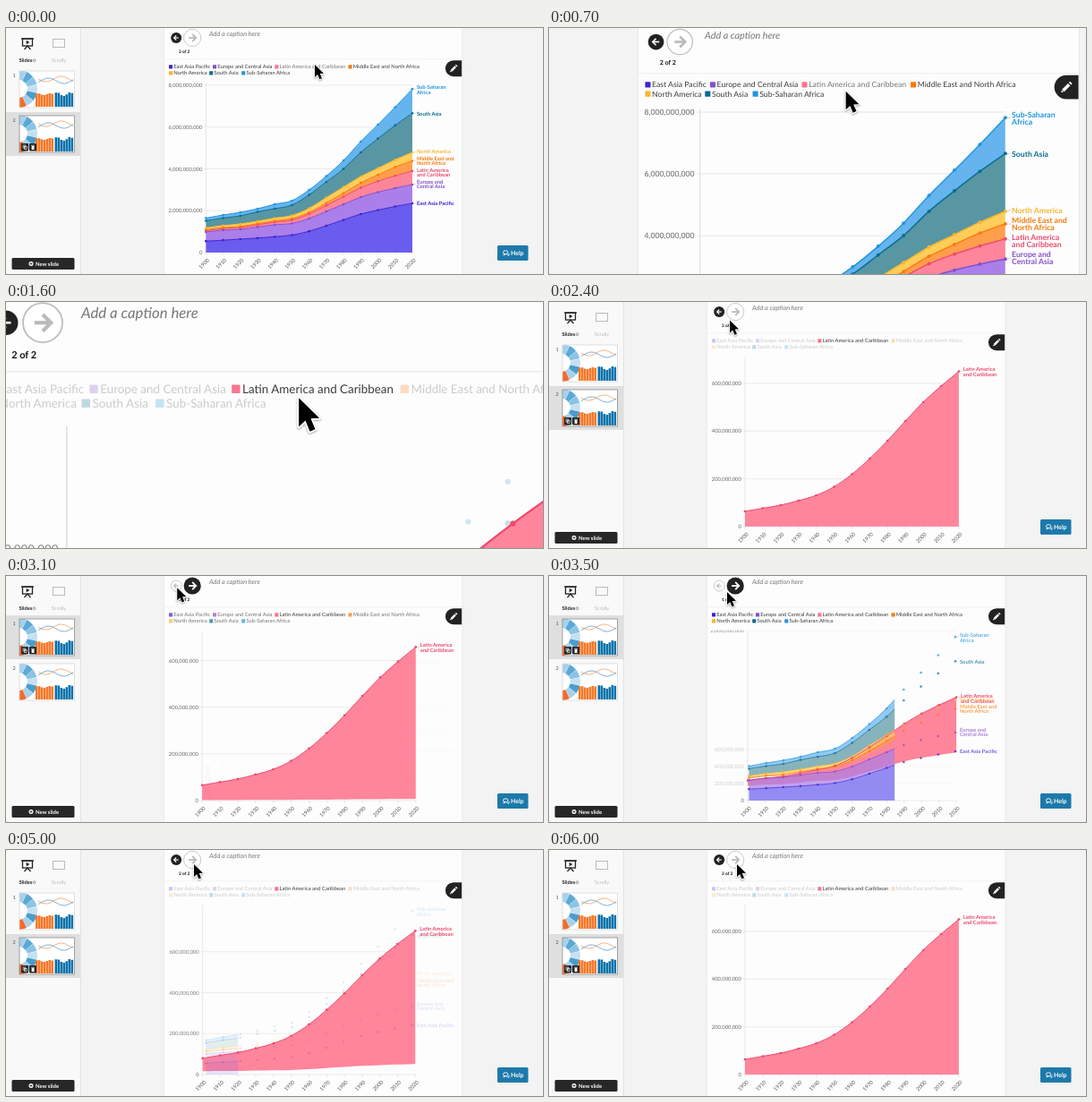
Recreate the animation shown at these times as an HTML page with a canvas. Size 600x275 px, loop 6100 ms.

```html
<!DOCTYPE html>
<html lang="en">
<head>
<meta charset="utf-8">
<title>Stacked area story</title>
<style>
html, body { margin: 0; width: 100%; height: 100%; overflow: hidden; background: #f3f3f3; }
canvas { display: block; width: 600px; height: 275px; }
</style>
</head>
<body>
<canvas id="stage" width="600" height="275"></canvas>
<script>
const ctx = document.getElementById('stage').getContext('2d');
ctx.textRendering = 'geometricPrecision';
const LOOP = 6100, BASE = 251, FOCUS = 2;
const CLICKS = { filter: 975, back: 2920, next: 4340 };
const WIDE = { left: 223.4, right: 454 }, ALONE = { left: 219, right: 457.9 };

// Cumulative heights in pixels for each decade, 1900 to 2020.
const europeTop = [23, 25, 26, 28.5, 31, 32.5, 38, 46, 54, 62, 67.5, 72, 76];
const focusAlone = [17, 20.5, 24, 29, 35, 44.5, 58.5, 76, 96, 118, 139, 157, 173.5];
const series = [
  { name: 'East Asia Pacific', line: '#3d22d6', fill: '#695cee', key: [182, 0],
    label: ['East Asia Pacific'], labelY: 196,
    top: [12.8, 13.8, 15, 16.2, 17.7, 19.5, 23.8, 30, 36.5, 43, 47.5, 51.5, 55] },
  { name: 'Europe and Central Asia', line: '#8450cf', fill: '#ab7fe9', key: [231, 0],
    label: ['Europe and', 'Central Asia'], labelY: 174.3, top: europeTop },
  { name: 'Latin America and Caribbean', line: '#ee4a6f', fill: '#ff859b', key: [300.3, 0],
    label: ['Latin America', 'and Caribbean'], labelY: 161.6,
    top: europeTop.map((y, i) => y + focusAlone[i] * .0877) },
  { name: 'Middle East and North Africa', line: '#f77b0b', fill: '#ff9e4b', key: [382.5, 0],
    label: ['Middle East and', 'North Africa'], labelY: 148.6,
    top: [25.6, 27.9, 29.2, 32.4, 35.5, 38, 45, 55.5, 66.5, 78, 87, 95.6, 102.5] },
  { name: 'North America', line: '#f9b52e', fill: '#ffcd5a', key: [182, 1],
    label: ['North America'], labelY: 138,
    top: [27.5, 30.2, 32, 35, 38.5, 41.5, 49.5, 61.5, 73.3, 85, 94.3, 103.7, 112] },
  { name: 'South Asia', line: '#0b6d91', fill: '#5796a2', key: [227.2, 1],
    label: ['South Asia'], labelY: 95.5,
    top: [35.5, 38.5, 41, 45.5, 49, 53, 64.5, 79, 93.6, 112, 127.4, 142.2, 155.7] },
  { name: 'Sub-Saharan Africa', line: '#2196de', fill: '#65b4ee', key: [263.2, 1],
    label: ['Sub-Saharan', 'Africa'], labelY: 68.7,
    top: [38.5, 42, 45, 49, 54, 58, 70, 85.5, 103, 124, 143, 162.5, 182.8] }
];
const drawOrder = [2, 0, 1, 3, 4, 5, 6];

const cursorPath = [[0, 345, 41], [500, 333.6, 48.3], [1620, 333, 47.7], [2400, 202, 20.5], [2750, 191, 13],
  [3050, 191, 13], [3500, 199, 18], [4000, 210, 16], [LOOP, 210, 16]];

const clamp = v => Math.max(0, Math.min(1, v));
const lerp = (a, b, k) => a + (b - a) * k;
const cubic = v => (v = clamp(v)) < .5 ? 4 * v ** 3 : 1 - 4 * (1 - v) ** 3;
const sine = v => (1 - Math.cos(Math.PI * clamp(v))) / 2;

function withAlpha(alpha, draw) {
  ctx.save();
  ctx.globalAlpha *= alpha;
  draw();
  ctx.restore();
}

function clipRect(x, y, w, h) {
  ctx.beginPath();
  ctx.rect(x, y, w, h);
  ctx.clip();
}

function rect(x, y, w, h, fill, radius = 0) {
  ctx.fillStyle = fill;
  ctx.beginPath();
  ctx.roundRect(x, y, w, h, radius);
  ctx.fill();
}

function circle(x, y, r, fill, stroke) {
  ctx.beginPath();
  ctx.arc(x, y, r, 0, 7);
  if (fill) { ctx.fillStyle = fill; ctx.fill(); }
  if (stroke) { ctx.strokeStyle = stroke; ctx.lineWidth = .8; ctx.stroke(); }
}

function stroke(points, color, width = 1) {
  ctx.strokeStyle = color;
  ctx.lineWidth = width;
  ctx.beginPath();
  points.forEach(p => ctx.lineTo(...p));
  ctx.stroke();
}

function text(value, x, y, size, color, style = '', align = 'left') {
  ctx.font = `${style} ${size}px Lato, sans-serif`;
  ctx.fillStyle = color;
  ctx.textAlign = align;
  ctx.textBaseline = 'alphabetic';
  ctx.fillText(value, x, y + size * .36);
}

function curve(points) {
  const n = points.length - 1;
  ctx.lineTo(...points[0]);
  for (let i = 0; i < n; i++) {
    const a = points[Math.max(0, i - 1)], b = points[i], c = points[i + 1], d = points[Math.min(n, i + 2)];
    ctx.bezierCurveTo(b[0] + (c[0] - a[0]) / 6, b[1] + (c[1] - a[1]) / 6,
      c[0] - (d[0] - b[0]) / 6, c[1] - (d[1] - b[1]) / 6, ...c);
  }
}

// 0 shows every series, 1 shows the focused one alone.
function focusAt(t) {
  if (t < CLICKS.back) return cubic((t - CLICKS.filter) / 1000);
  if (t < CLICKS.next) return 1 - cubic((t - CLICKS.back) / 1000);
  return cubic((t - CLICKS.next) / 1000);
}

function legendFade(t) {
  const since = start => clamp((t - start) / 300);
  if (t < CLICKS.back) return since(CLICKS.filter);
  return t < CLICKS.next ? 1 - since(CLICKS.back) : since(CLICKS.next);
}

function drawThumb(y, number, selected) {
  if (selected) rect(0, y - 4, 83, 49, '#dfdfdf');
  text(number, 9, y + 5, 5.5, '#555', '', 'center');
  rect(15, y, 61.5, 41, '#fff');
  ctx.save();
  clipRect(15, y, 61.5, 41);
  const shades = ['#a7d1ea', '#5ba9d6', '#8cc3e4', '#c5e0f1', '#4b9dcd', '#a7d1ea', '#f26b2c'];
  shades.forEach((shade, i) => {
    const a = -1.57 + i * .45;
    ctx.fillStyle = shade;
    ctx.beginPath();
    ctx.arc(14, y + 20, 21, a, a + .43);
    ctx.arc(14, y + 20, 10, a + .43, a, true);
    ctx.fill();
  });
  const wave = (phase, height) => Array.from({ length: 9 }, (_, i) =>
    [36 + i * 4.9, y + height + 3.2 * Math.sin(i * .9 + phase)]);
  stroke(wave(0, 9), '#f0924e', .7);
  stroke(wave(2.6, 11), '#4d8fb8', .7);
  for (let i = 0; i < 7; i++) {
    const orange = 14 + Math.sin(i * 1.3 + 1), blue = 14 + 2 * Math.sin(i * 1.3 + 1);
    rect(33 + i * 2.9, y + 40 - orange, 2.6, orange, '#f5792a');
    rect(54.5 + i * 3, y + 40 - blue, 2.6, blue, '#0c73aa');
  }
  ctx.restore();
  ctx.strokeStyle = selected ? '#8d8d8d' : '#d8d8d8';
  ctx.lineWidth = .8;
  ctx.strokeRect(15, y, 61.5, 41);
  if (!selected) return;
  for (const x of [17, 26]) rect(x, y + 31, 8, 8.5, '#252525', 1);
  ctx.strokeStyle = '#fff';
  ctx.lineWidth = .6;
  ctx.strokeRect(19, y + 33, 2.8, 3);
  ctx.strokeRect(20.4, y + 34.3, 2.8, 3);
  rect(28.6, y + 34, 2.9, 4, '#fff');
  rect(28, y + 32.8, 4, .7, '#fff');
}

function drawSidebar(slide) {
  rect(0, 0, 83, 275, '#f9f9f9');
  stroke([[83.3, 0], [83.3, 275]], '#dcdcdc', .8);
  stroke([[17, 12], [31, 12]], '#222', 1.3);
  ctx.strokeRect(18.5, 12, 11, 8);
  stroke([[20.5, 24], [24, 20], [27.5, 24]], '#222', 1.2);
  ctx.fillStyle = '#222';
  ctx.beginPath();
  ctx.moveTo(22.7, 13.8); ctx.lineTo(22.7, 18.3); ctx.lineTo(26.4, 16);
  ctx.fill();
  text('Slides', 14.5, 36, 5.7, '#222', 'bold');
  circle(31.5, 36.2, 1.4, null, '#777');
  ctx.strokeStyle = '#bbb';
  ctx.lineWidth = 1;
  ctx.strokeRect(52.5, 12.5, 13, 9);
  text('Scrolly', 59, 36, 5.7, '#bbb', '', 'center');
  drawThumb(48, '1', slide === 1);
  drawThumb(98, '2', slide === 2);
  rect(6.5, 257, 70, 13, '#272727', 1.5);
  circle(28, 263.5, 2.5, '#fff');
  stroke([[26.6, 263.5], [29.4, 263.5]], '#272727', .8);
  stroke([[28, 262.1], [28, 264.9]], '#272727', .8);
  text('New slide', 33, 263.5, 6, '#fff', 'bold');
}

function drawNavButton(x, r, dir, active) {
  circle(x, 11, r, active ? '#222' : '#fff', active ? null : '#bdbdbd');
  const color = active ? '#fff' : '#bbb', a = r * .42;
  stroke([[x - a * dir, 11], [x + a * dir, 11]], color, r * .19);
  stroke([[x, 11 - a], [x + a * dir, 11], [x, 11 + a]], color, r * .19);
}

function drawHeader(slide) {
  stroke([[177, 34.8], [509.5, 34.8]], '#ededed', .7);
  drawNavButton(190.2, 6, -1, slide === 2);
  drawNavButton(208.2, 9.6, 1, slide === 1);
  text(`${slide} of 2`, 199.1, 26.6, 4.8, '#111', 'bold', 'center');
  text('Add a caption here', 227, 6.3, 7.3, '#777', 'italic');
}

function drawLegend(t) {
  const fade = legendFade(t);
  series.forEach((s, i) => {
    const [x, row] = s.key, y = 43.3 + row * 7;
    const own = i === FOCUS, hover = own && t < CLICKS.filter;
    withAlpha(own ? 1 : lerp(1, .25, fade), () => {
      rect(x, y - 2.1, 4.1, 4.2, own ? '#fa7490' : s.line, .4);
      text(s.name, x + 5.2, y, 5.85, hover ? '#777' : '#3c3c3c');
    });
  });
}

function drawAxes(focus, left, right) {
  const perBillion = lerp(23.375, 266.7, focus);
  const tick = (billions, alpha) => {
    const y = BASE - billions * perBillion;
    if (y < 59) return;
    withAlpha(alpha, () => {
      clipRect(177, 60.5, 333, 200);
      stroke([[left - 2, y], [right, y]], '#e3e3e3', .7);
      text((billions * 1e9).toLocaleString('en-US'), left - 4.1, y, 5.85, '#666', '', 'right');
    });
  };
  tick(0, 1);
  for (const b of [2, 4, 6, 8]) tick(b, 1 - focus);
  for (const b of [.2, .4, .6]) tick(b, focus);
  stroke([[left, 61.5], [left, BASE]], '#dedede', .7);
  for (let i = 0; i <= 12; i++) {
    const x = lerp(left, right, i / 12);
    stroke([[x, BASE], [x, BASE + 2.5]], '#d0d0d0', .6);
    ctx.save();
    ctx.translate(x + 2.6, 258.5);
    ctx.rotate(-Math.PI / 4);
    text(1900 + i * 10, 0, 0, 5.9, '#555', '', 'right');
    ctx.restore();
  }
}

function drawChart(focus) {
  const left = lerp(WIDE.left, ALONE.left, focus), right = lerp(WIDE.right, ALONE.right, focus);
  const rest = 1 - focus, span = WIDE.right - WIDE.left;
  drawAxes(focus, left, right);

  const shapes = series.map((s, i) => {
    const own = i === FOCUS;
    const x = k => own ? lerp(left, right, k / 12) : WIDE.left + k * span / 12;
    const base = s.top.map((_, k) => i ? series[i - 1].top[k] : 0);
    return {
      s, alpha: own ? 1 : rest,
      top: s.top.map((h, k) => [x(k), BASE - (own ? lerp(h, focusAlone[k], focus) : h)]),
      bottom: base.map((h, k) => [x(k), BASE - (own ? h * rest : h)]).reverse()
    };
  });
  const ordered = drawOrder.map(i => shapes[i]);
  const wipe = (shape, draw) => withAlpha(shape.alpha, () => {
    if (shape.s !== series[FOCUS]) clipRect(222, 55, 1.4 + span * rest, 197);
    draw();
  });

  for (const shape of ordered) wipe(shape, () => {
    ctx.fillStyle = shape.s.fill;
    ctx.beginPath();
    curve(shape.top);
    curve(shape.bottom);
    ctx.fill();
  });
  for (const shape of ordered) wipe(shape, () => {
    ctx.strokeStyle = shape.s.line;
    ctx.lineWidth = 1;
    ctx.beginPath();
    curve(shape.top);
    ctx.stroke();
  });
  for (const { s, top, alpha } of ordered) withAlpha(alpha, () => {
    top.forEach(p => circle(...p, 1.35, s.line));
    const own = s === series[FOCUS], end = top[12];
    const y = own ? lerp(s.labelY, 77.8, focus) : s.labelY;
    stroke([[end[0] + 1.5, end[1]], [end[0] + 4.2, y]], '#bbb', .5);
    s.label.forEach((line, k) =>
      text(line, end[0] + 4.9, y + (k - (s.label.length - 1) / 2) * 5.4, 5.85, s.line, 'bold'));
  });
}

function drawButtons() {
  rect(491, 36.2, 18.2, 18, '#222', [9, 0, 0, 9]);
  stroke([[497.6, 47.8], [502.2, 43.2]], '#fff', 2.4);
  stroke([[502.8, 42.6], [503.7, 41.7]], '#fff', 2.4);
  stroke([[496.4, 49], [497.4, 48]], '#fff', 1.2);
  rect(549, 243, 34.5, 17, '#1d79ab', 1.5);
  ctx.strokeStyle = '#fff';
  ctx.lineWidth = .9;
  ctx.beginPath();
  ctx.ellipse(558.2, 250.8, 2.7, 2, 0, 0, 7);
  ctx.stroke();
  stroke([[556.7, 252.4], [555.8, 254], [558.3, 252.9]], '#fff', .8);
  stroke([[559.6, 253.6], [562, 254.4], [562, 251.8]], '#fff', .8);
  text('Help', 564, 251.5, 6.9, '#fff', 'bold');
}

function drawCursor(t) {
  const i = cursorPath.findIndex(p => p[0] > t);
  const [t0, x0, y0] = cursorPath[i - 1], [t1, x1, y1] = cursorPath[i];
  const k = sine((t - t0) / (t1 - t0));
  ctx.save();
  ctx.translate(lerp(x0, x1, k), lerp(y0, y1, k));
  ctx.beginPath();
  [[0, 0], [0, 14], [3.2, 11], [5.4, 16.3], [8, 15.2], [5.8, 10], [10, 9.8]].forEach(p => ctx.lineTo(...p));
  ctx.closePath();
  ctx.lineJoin = 'round';
  ctx.strokeStyle = '#fff';
  ctx.lineWidth = 1.8;
  ctx.shadowColor = 'rgba(0,0,0,.35)';
  ctx.shadowBlur = 2;
  ctx.shadowOffsetY = 1;
  ctx.stroke();
  ctx.shadowColor = 'transparent';
  ctx.fillStyle = '#000';
  ctx.fill();
  ctx.restore();
}

function draw(t) {
  const slide = t >= CLICKS.back && t < CLICKS.next ? 1 : 2;
  const zoom = 2.293 ** (sine((t - 50) / 1350) - sine((t - 1620) / 560));
  ctx.setTransform(1, 0, 0, 1, 0, 0);
  rect(0, 0, 600, 275, '#f3f3f3');
  ctx.setTransform(zoom, 0, 0, zoom, 337.5 * (1 - zoom), 1.6 * (1 - zoom));
  rect(176.4, -2, 333.8, 280, '#e6e6e6');
  rect(177, -2, 332.5, 280, '#fdfdfd');
  drawSidebar(slide);
  drawHeader(slide);
  drawLegend(t);
  drawChart(focusAt(t));
  drawButtons();
  drawCursor(t);
}

const start = performance.now();
function frame() {
  draw((performance.now() - start) % LOOP);
  requestAnimationFrame(frame);
}
frame();
</script>
</body>
</html>
```
